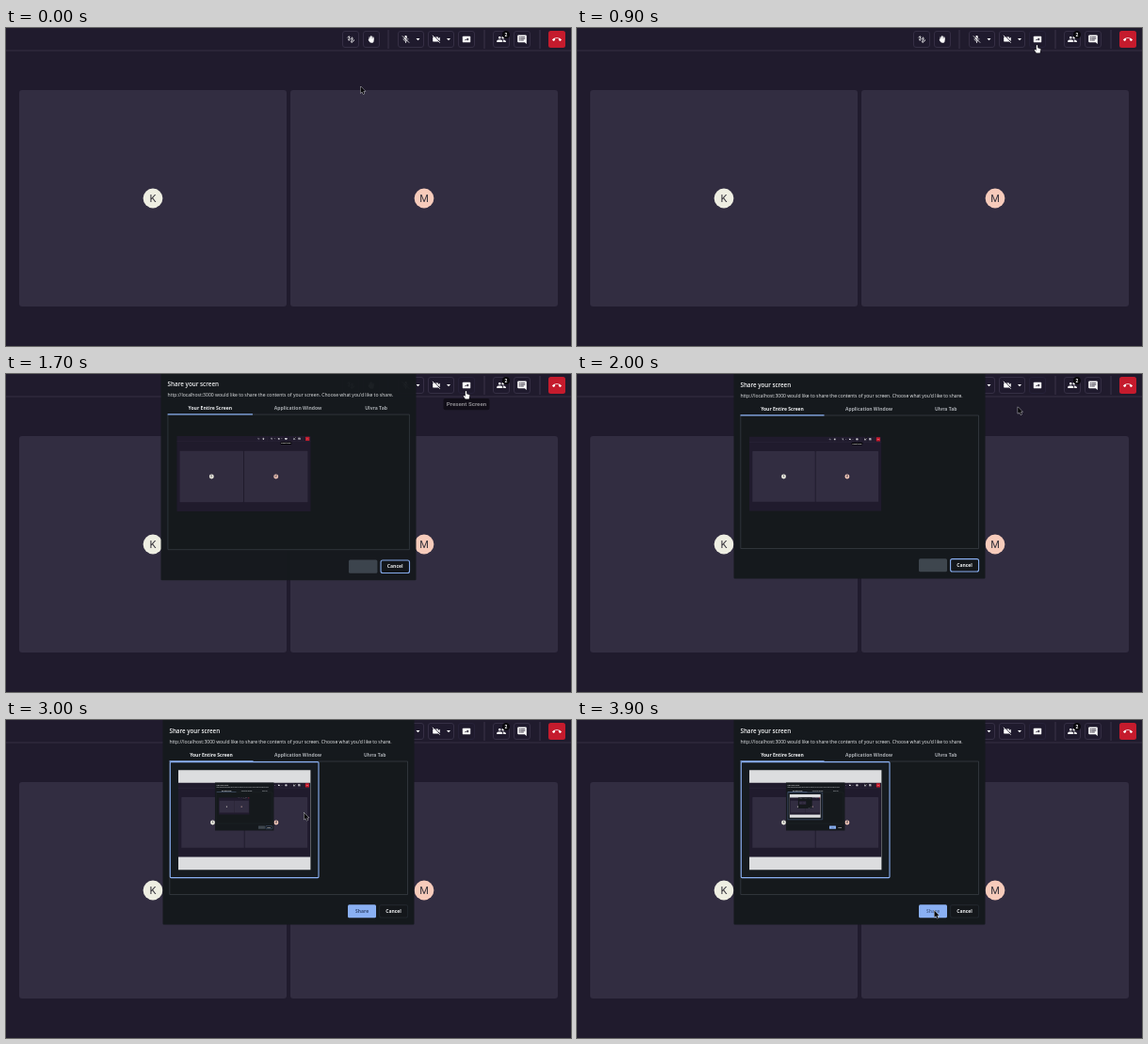
Animation, 600 px wide and 338 px high, one loop 4000 ms. Source, as an HTML page with a canvas:

```html
<!DOCTYPE html>
<html lang="en">
<head>
<meta charset="utf-8">
<title>Screen sharing</title>
<style>
html, body { margin: 0; width: 100%; height: 100%; overflow: hidden; background: #201b2d; }
canvas { display: block; width: 600px; height: 338px; }
</style>
</head>
<body>
<canvas></canvas>
<script>
const LOOP = 4000, STEP = 100;
const DIALOG_AT = 1700, SELECT_AT = 3000;
const UI = '"Open Sans", sans-serif', APP = 'Roboto, sans-serif';
const PAGE = '#201b2d', PANEL = '#15191d', BLUE = '#8ab0f3';

const canvas = document.querySelector('canvas');
const ctx = canvas.getContext('2d');
const ratio = window.devicePixelRatio || 1;
canvas.width = 600 * ratio;
canvas.height = 338 * ratio;

// Cursor path: time, x, y
const path = [
  [0, 376.5, 62], [300, 440, 38], [600, 483, 20], [800, 488.5, 18],
  [1850, 488.5, 18], [2400, 414, 80], [2500, 390.5, 88.5], [2800, 316.5, 98.5],
  [3000, 316.5, 98.5], [3300, 345, 150], [3600, 379.5, 202.5], [LOOP, 379.5, 202.5]
];

// Icons on a 24-unit grid: [path, stroke width or 0 for fill, colour]
const icons = {
  draw: [['M4 7C8 2 11 4 8 9S6 17 10 13S16 5 17 9S11 18 14 20S18 15 21 14', 2.5]],
  hand: [['M7 12V6M10.5 11V3.5M14 11V4M17.5 12V6.5M5 13L8 17', 2.8],
         ['M5.6 10H18.9V15Q18.9 22 12.5 22Q8.5 22 6.5 18.5L3.5 13.5L5.6 12.5Z', 0]],
  mic: [['M12 5V11', 6], ['M6 11C6 19 18 19 18 11M12 17V21', 1.8],
        ['M5 2L21 18', 2, PAGE], ['M3.6 3.6L20.4 20.4', 1.9]],
  camera: [['M4 6H16Q17 6 17 7V10.5L21 6.5V17.5L17 13.5V17Q17 18 16 18H4Q3 18 3 17V7Q3 6 4 6Z', 0],
           ['M4.5 1.5L21.5 18.5', 2, PAGE], ['M2.7 2.7L20.3 20.3', 1.9]],
  present: [['M4 4H20Q22 4 22 6V18Q22 20 20 20H4Q2 20 2 18V6Q2 4 4 4Z', 0],
            ['M7 15.5Q8 11 14 11V8L18 12L14 16V13.3Q10 13.2 7 15.5Z', 0, PAGE]],
  people: [['M8 8H8.01M16 8H16.01', 6],
           ['M1 19V16.5C1 12 15 12 15 16.5V19ZM17 19V16.5Q17 14.4 15.3 13C18 12.8 23 14 23 16.5V19Z', 0]],
  chat: [['M4 2H20Q22 2 22 4V22L18 18H4Q2 18 2 16V4Q2 2 4 2Z', 0],
         ['M6 6.5H8M10 6.5H18M6 10H8M10 10H18M6 13.5H8M10 13.5H15', 1.7, PAGE]],
  hangup: [['M0 12.4C6 5.2 18 5.2 24 12.4L20.5 15.8L16.6 13.4V9.7Q12 8.3 7.4 9.7V13.4L3.5 15.8Z', 0]]
};
for (const parts of Object.values(icons))
  for (const part of parts) part[0] = new Path2D(part[0]);

const arrowShape = new Path2D('M0 0V7.2L1.7 5.7L2.9 8.4L4.1 7.9L2.9 5.3H5.1Z');
const handShape = new Path2D('M-.7 .6Q0 -.4 .7 .6V3.2L3.4 3.9Q4 4.1 3.9 4.9L3.2 8.6H-.7L-2.8 5.4Q-2.4 4.6 -.7 5.8Z');

function box(x, y, w, h, r, fill, stroke, line = 1) {
  ctx.beginPath();
  ctx.roundRect(x, y, w, h, r);
  if (fill) { ctx.fillStyle = fill; ctx.fill(); }
  if (stroke) { ctx.strokeStyle = stroke; ctx.lineWidth = line; ctx.stroke(); }
}

function disc(x, y, r, fill) {
  box(x - r, y - r, 2 * r, 2 * r, r, fill);
}

function text(str, x, y, font, fill = '#fff', align = 'center') {
  ctx.font = font;
  ctx.fillStyle = fill;
  ctx.textAlign = align;
  ctx.fillText(str, x, y);
}

function icon(name, x, y, size = 0.44) {
  ctx.save();
  ctx.translate(x, y);
  ctx.scale(size, size);
  ctx.translate(-12, -12);
  ctx.lineCap = 'round';
  for (const [shape, width, colour = '#fff'] of icons[name]) {
    ctx.fillStyle = ctx.strokeStyle = colour;
    ctx.lineWidth = width;
    width ? ctx.stroke(shape) : ctx.fill(shape);
  }
  ctx.restore();
}

function button(x, w, hovered) {
  box(x + 0.5, 3.5, w - 1, 17, 2.5, '#1f1a2d', hovered ? '#28233a' : '#383248', 0.9);
}

function chevron(x) {
  ctx.fillStyle = '#fff';
  ctx.fill(new Path2D(`M${x - 2} 11H${x + 2}L${x} 13.2Z`));
}

function toolbar(t) {
  box(0, 23.5, 600, 1, 0, '#373145');
  for (const x of [406, 508, 567]) box(x - 0.4, 2, 0.8, 20, 0, '#413b50');
  for (const [x, w] of [[357, 18], [379, 18], [416, 28], [448, 28], [517, 18], [539, 18]]) button(x, w);
  button(480, 18, t >= 600);
  box(576, 3, 18, 18, 2.5, '#c51b2d');
  icon('draw', 366, 12, 0.4);
  icon('hand', 388, 12, 0.38);
  icon('mic', 424.5, 12, 0.4);
  icon('camera', 457, 12, 0.42);
  icon('present', 489, 12, 0.42);
  icon('people', 526, 12);
  icon('chat', 548, 12.3, 0.48);
  icon('hangup', 585, 12.3, 0.42);
  chevron(437.5);
  chevron(470);
  disc(531, 7, 4, '#08070b');
  text('2', 531, 8.8, `bold 5px ${APP}`);
}

function tile(x, letter, colour) {
  box(x, 66, 284, 230, 3, '#322d41');
  disc(x + 142, 181, 10.4, colour);
  text(letter, x + 142, 185, `11px ${APP}`, '#33313a');
}

function tooltip(t) {
  const alpha = t < 1000 ? 0 : t < 1100 ? 0.5 : t < 1700 ? 1 : t < 1800 ? 0.5 : 0;
  if (!alpha) return;
  ctx.save();
  ctx.globalAlpha = alpha;
  box(464.5, 26, 49, 12.2, 2, '#030205');
  text('Present Screen', 489, 34.3, `bold 6.2px ${APP}`);
  ctx.restore();
}

// The preview is a picture of the stage that is refreshed about once a second.
function preview(t) {
  const taken = t < 2700 ? 1600 : t < 3700 ? 2600 : 3600;
  const k = 140.4 / 600;
  if (t >= SELECT_AT) box(183, 53.2, 140.4, 106, 0, '#dcdddf');
  ctx.save();
  ctx.translate(183, 66.6);
  ctx.scale(k, k);
  ctx.beginPath();
  ctx.rect(0, 0, 600, 338);
  ctx.clip();
  stage(taken);
  ctx.restore();
}

function dialog(t) {
  const selected = t >= SELECT_AT;
  ctx.save();
  if (t < DIALOG_AT + STEP) {
    ctx.globalAlpha = 0.97;
    ctx.translate(300, 107);
    ctx.scale(1.015, 1.015);
    ctx.translate(-300, -107);
  }
  box(166.5, -4, 267, 221.5, 1, PANEL);
  text('Share your screen', 173.5, 14.3, `600 6.2px ${UI}`, '#f4f5f6', 'left');
  text("http://localhost:3000 would like to share the contents of your screen. Choose what you'd like to share.",
    173.5, 24.8, `5px ${UI}`, '#eceef0', 'left');
  text('Your Entire Screen', 218, 38.7, `bold 5px ${UI}`, '#f0f2f4');
  text('Application Window', 310, 38.7, `bold 5px ${UI}`, '#a9adb2');
  text('Ulvra Tab', 391.7, 38.7, `bold 5px ${UI}`, '#a9adb2');

  box(173.8, 44, 252.7, 141.5, 0, '#15191c', '#3b4148', 0.7);
  box(173.5, 43.2, 89, 1.2, 0, BLUE);
  if (selected) box(174.3, 44.6, 157.7, 123, 1, '#161b20', BLUE, 1.1);
  preview(t);

  box(363, 196.2, 30, 14, 1.5, selected ? BLUE : '#3e464e');
  if (selected) text('Share', 378, 205, `bold 5px ${UI}`, t >= 3600 ? '#4f6999' : '#354c78');
  box(396.6, 196.6, 30, 13.4, 2, '#14171b', selected ? '#20252b' : BLUE, 1.1);
  text('Cancel', 411.5, 205, `bold 5px ${UI}`, '#eef0f2');
  ctx.restore();
}

function stage(t) {
  box(0, 0, 600, 338, 0, PAGE);
  toolbar(t);
  tile(14, 'K', '#eeeee2');
  tile(302, 'M', '#f7cbbb');
  tooltip(t);
  if (t >= DIALOG_AT) dialog(t);
}

function cursor(t) {
  const i = path.findIndex(p => p[0] > t);
  const [t0, x0, y0] = path[i - 1], [t1, x1, y1] = path[i];
  const k = (t - t0) / (t1 - t0);
  const x = x0 + (x1 - x0) * k, y = y0 + (y1 - y0) * k;
  const pointing = x > 480 && y < 21;
  const shape = pointing ? handShape : arrowShape;
  ctx.save();
  ctx.translate(x, y);
  ctx.lineJoin = 'round';
  ctx.lineWidth = 0.8;
  ctx.fillStyle = pointing ? '#fff' : '#08080a';
  ctx.strokeStyle = pointing ? '#08080a' : '#e8e8ec';
  ctx.stroke(shape);
  ctx.fill(shape);
  ctx.restore();
}

const start = performance.now();
function frame() {
  const elapsed = (performance.now() - start) % LOOP;
  const t = Math.floor(elapsed / STEP) * STEP;
  ctx.setTransform(ratio, 0, 0, ratio, 0, 0);
  stage(t);
  cursor(t);
  requestAnimationFrame(frame);
}
frame();
</script>
</body>
</html>
```
